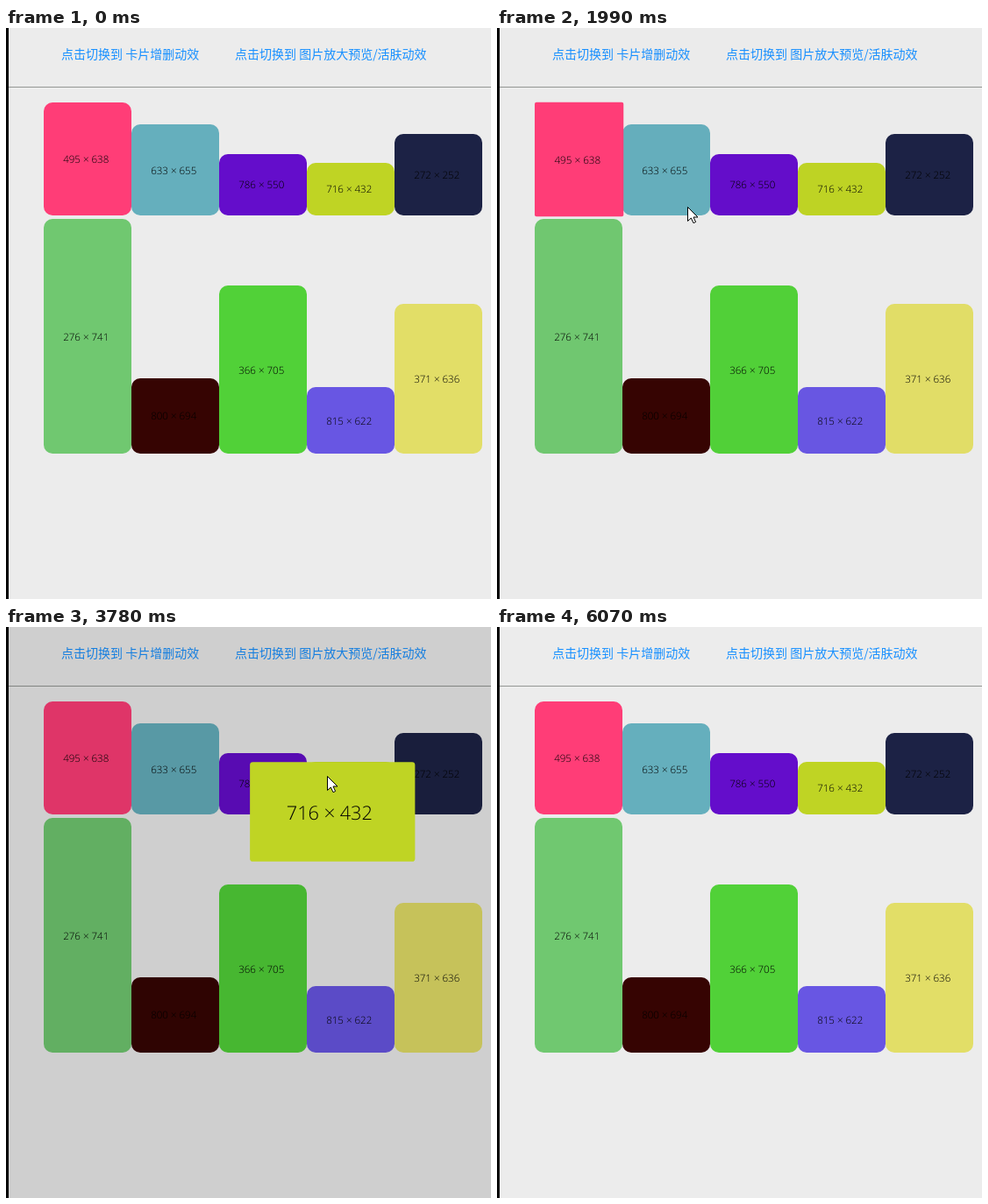
Write an HTML page that moves like this. It is 553 by 652 pixels and loops after 6450 ms.

```html
<!DOCTYPE html>
<html lang="zh">
<head>
<meta charset="utf-8">
<title>Card preview</title>
<style>
html, body { margin: 0; width: 100%; height: 100%; overflow: hidden; background: #ececec; }
svg { display: block; }
.link { font: 14px "Noto Sans CJK SC", "Noto Sans CJK", sans-serif; fill: #1890ff; }
.size { font-family: "Open Sans", sans-serif; font-weight: 300; text-anchor: middle; text-rendering: geometricPrecision; }
.hint { font: 12px "Noto Sans CJK SC", "Noto Sans CJK", sans-serif; fill: #444; }
</style>
</head>
<body>
<svg id="stage" width="553" height="652" viewBox="0 0 553 652">
  <rect width="553" height="652" fill="#ececec"/>
  <text class="link" x="63" y="35">点击切换到 卡片增删动效</text>
  <text class="link" x="261" y="35">点击切换到 图片放大预览/活肤动效</text>
  <rect x="3" y="67" width="550" height="1" fill="#949794"/>
  <g id="cards"></g>
  <rect id="mask" width="553" height="652" opacity="0"/>
  <g id="views"></g>
  <rect width="3" height="652"/>
  <g id="tip">
    <rect x="3" y="24" width="60" height="21" rx="1" opacity=".35"/>
    <rect x="1.5" y="22.5" width="59" height="20" fill="#fff" stroke="#767676"/>
    <text class="hint" x="6" y="36.5">点击预览</text>
  </g>
  <path id="arrow" d="M.5 .5V16.5L4.3 13L7 18.7L9.6 17.5L7 12H12Z" fill="#fff" stroke="#000"/>
  <g id="hand" fill="#fff" stroke="#000" stroke-linejoin="round">
    <path d="M5.5 13.5V2.5C5.5 .3 8.5 .3 8.5 2.5V8.5C9 7.2 11.3 7.4 11.5 9C12.3 8 14.2 8.4 14.4 9.8C15.3 9 17 9.6 17 11.3V16C17 18 15.8 19.5 15.5 22.5H7.5C7 20 4 17.5 1.2 13.8C.2 11.8 2.3 10.8 3.6 12Z"/>
    <path d="M8.5 8V12M11.5 9V12M14.4 10V12.5" fill="none"/>
  </g>
</svg>
<script>
const LOOP = 6450, ZOOM = 330, FADE = 200, STEP = 10;
const MID = { x: 284.25, y: 326.75 }, MAX_W = 562.5;
const $ = id => document.getElementById(id);

function add(parent, tag, attrs, text) {
  const el = document.createElementNS("http://www.w3.org/2000/svg", tag);
  for (const k in attrs) el.setAttribute(k, attrs[k]);
  if (text) el.textContent = text;
  parent.appendChild(el);
  return el;
}

function label(parent, card, cx, cy, w) {
  add(parent, "text", {
    class: "size", x: cx - .018 * w, y: cy + .395 * .1155 * w, "font-size": .1155 * w
  }, `${card.w} × ${card.h}`);
}

const cards = [
  [495, 638, "#ff3d77"], [633, 655, "#65afbd"], [786, 550, "#640dcb"],
  [716, 432, "#bfd424"], [272, 252, "#1c2245"], [276, 741, "#70c870"],
  [800, 694, "#360402"], [366, 705, "#51d138"], [815, 622, "#6856e3"],
  [371, 636, "#e2de67"]
].map(([w, h, fill], i) => {
  const bottom = i < 5 ? 213.9 : 486.3, tall = 100 * h / w;
  const x = 43 + 100 * (i % 5), y = Math.round(bottom - tall);
  const card = { w, h, fill, x, y, b: Math.round(bottom), cx: x + 50, cy: bottom - tall / 2 };
  const box = { x, y, width: 100, height: card.b - y, rx: 10 };
  add($("cards"), "rect", { ...box, fill });
  label($("cards"), card, card.cx, card.cy, 100);
  card.shade = add($("cards"), "rect", { ...box, opacity: 0 });
  return card;
});

// Each preview: card, opening time, closing time
const views = [[0, 1030, 1686], [3, 2830, 3613.7], [9, 4642, 5480]].map(([i, open, close]) => {
  const card = cards[i], w = Math.min(card.w, MAX_W), h = w * card.h / card.w;
  const g = add($("views"), "g", {});
  add(g, "rect", { x: -w / 2, y: -h / 2, width: w, height: h, rx: 10, fill: card.fill });
  label(g, card, 0, 0, w);
  return { card, open, close, w, g };
});

const tips = [[870, 1020], [2585, 2825], [4565, 4642]];

const path = [
  [0, 458, 660], [80, 458, 660], [640, 112, 160], [1280, 112, 160], [1400, 162, 189],
  [1560, 216, 204], [1980, 216, 204], [2280, 366, 170], [3920, 366, 170],
  [4200, 482, 400], [5080, 482, 400], [5330, 444, 361], [5720, 444, 361],
  [5960, 452, 660], [LOOP, 458, 660]
];

const clamp = v => Math.max(0, Math.min(1, v));

// CSS "ease": cubic-bezier(.25, .1, .25, 1)
function ease(x) {
  if (x <= 0 || x >= 1) return clamp(x);
  const curve = (s, a, b) => 3 * s * (1 - s) ** 2 * a + 3 * s * s * (1 - s) * b + s ** 3;
  let lo = 0, hi = 1;
  for (let i = 0; i < 24; i++) {
    const m = (lo + hi) / 2;
    if (curve(m, .25, .25) < x) lo = m; else hi = m;
  }
  return curve(lo, .1, 1);
}

function pointer(t) {
  const i = Math.max(1, path.findIndex(p => p[0] > t));
  const [t0, x0, y0] = path[i - 1], [t1, x1, y1] = path[i];
  const u = clamp((t - t0) / (t1 - t0)), k = u * u * (3 - 2 * u);
  return { x: Math.round(x0 + (x1 - x0) * k), y: Math.round(y0 + (y1 - y0) * k) };
}

const shown = (v, t) => t >= v.open && t < v.close + ZOOM;

function hovered(t) {
  if (views.some(v => shown(v, t))) return null;
  const p = pointer(t);
  return cards.find(c => p.x >= c.x && p.x < c.x + 100 && p.y >= c.y && p.y < c.b);
}

// Hover shade of each card over the loop
cards.forEach(c => c.levels = [0]);
for (let t = STEP; t <= LOOP; t += STEP) {
  const over = hovered(t);
  for (const c of cards) {
    const last = c.levels[c.levels.length - 1];
    c.levels.push(clamp(last + (c === over ? 1 : -1) * STEP / FADE));
  }
}

function draw(t) {
  for (const c of cards) c.shade.setAttribute("opacity", .5 * c.levels[Math.floor(t / STEP)]);

  let dim = 0;
  for (const v of views) {
    const on = shown(v, t);
    v.g.setAttribute("visibility", on ? "visible" : "hidden");
    if (!on) continue;
    const p = t < v.close ? ease((t - v.open) / ZOOM) : 1 - ease((t - v.close) / ZOOM);
    const x = v.card.cx + (MID.x - v.card.cx) * p, y = v.card.cy + (MID.y - v.card.cy) * p;
    const scale = (100 + (v.w - 100) * p) / v.w;
    v.g.setAttribute("transform", `translate(${x} ${y}) scale(${scale})`);
    dim = .65 * p;
  }
  $("mask").setAttribute("opacity", dim);

  const m = pointer(t), hand = !!hovered(t);
  $("arrow").setAttribute("transform", `translate(${m.x} ${m.y})`);
  $("hand").setAttribute("transform", `translate(${m.x - 5} ${m.y - 4})`);
  $("arrow").setAttribute("visibility", hand ? "hidden" : "visible");
  $("hand").setAttribute("visibility", hand ? "visible" : "hidden");

  const tip = tips.find(([from, to]) => t >= from && t < to);
  $("tip").setAttribute("opacity", tip ? clamp((t - tip[0]) / 240) : 0);
  $("tip").setAttribute("transform", `translate(${m.x} ${m.y})`);
}

const start = performance.now();
function frame() {
  draw((performance.now() - start) % LOOP);
  requestAnimationFrame(frame);
}
frame();
</script>
</body>
</html>
```
